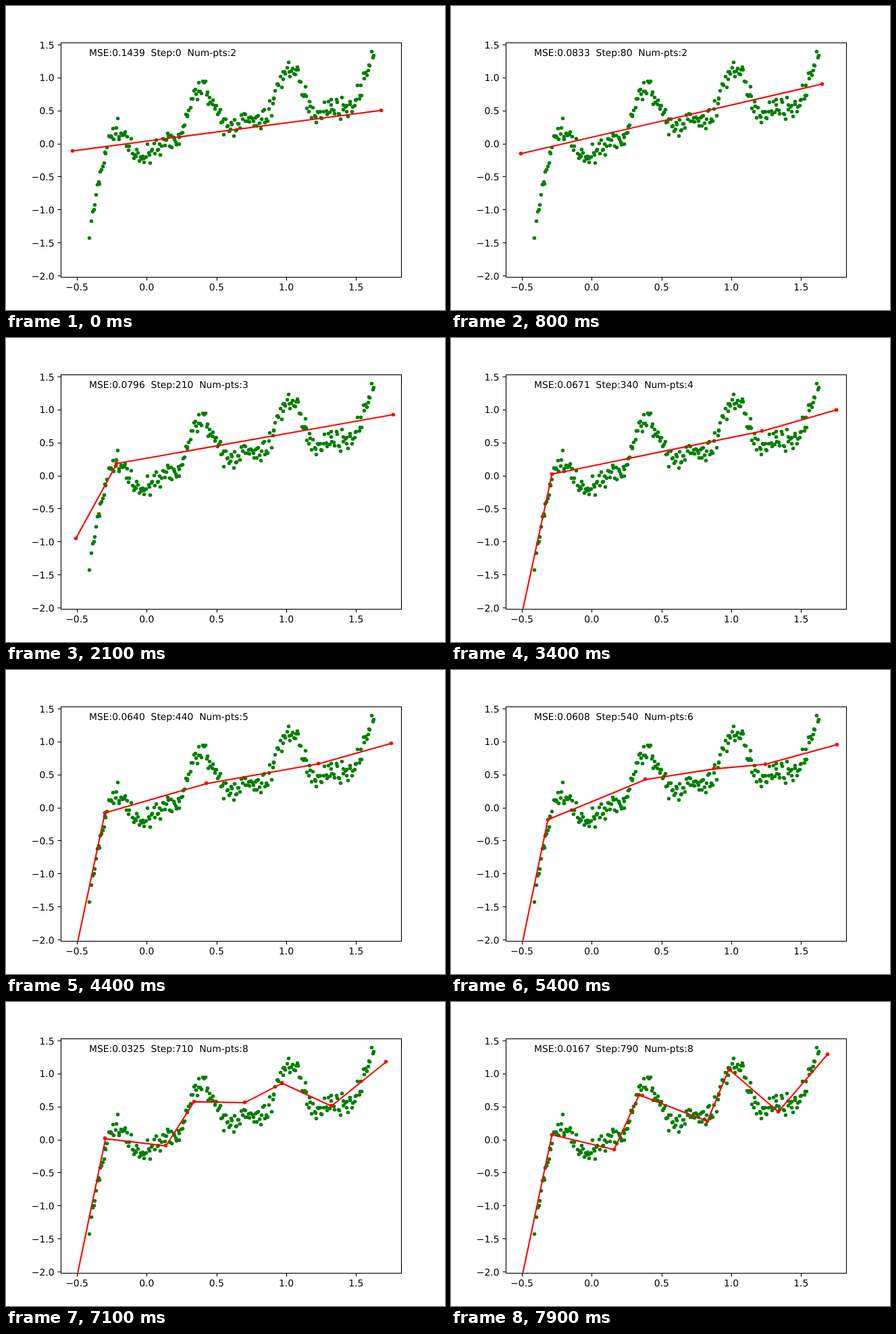
An HTML page that plays this animation: 650x450 px, repeating every 8000 ms.

```html
<!DOCTYPE html>
<html lang="en">
<head>
<meta charset="utf-8">
<title>Piecewise linear fit</title>
<style>
html, body { margin: 0; width: 100%; height: 100%; overflow: hidden; background: #fff; }
svg { display: block; }
text { font: 13.89px "DejaVu Sans", sans-serif; white-space: pre; text-rendering: geometricPrecision; }
</style>
</head>
<body>
<svg id="plot" width="650" height="450" viewBox="0 0 650 450">
  <clipPath id="area"><rect x="81.25" y="54" width="503.75" height="346.5"/></clipPath>
  <g clip-path="url(#area)">
    <g id="dots" fill="#008000"></g>
    <polyline id="line" transform="translate(.5 .5)" fill="none" stroke="#f00" stroke-width="2.08" stroke-linejoin="round" stroke-linecap="square"/>
    <g id="nodes" fill="#f00"></g>
  </g>
  <g id="axes" stroke="#000" stroke-width="1.11">
    <rect x="81.5" y="54.5" width="504" height="347" fill="none"/>
  </g>
  <g id="labels"></g>
  <text id="status" x="123" y="74"></text>
</svg>
<script>
const $ = id => document.getElementById(id);
const toX = x => 208.4 + x * 206.6;
const toY = y => 204.1 - y * 97.72;
const snap = v => Math.floor(v) + .5;

function add(parent, tag, attrs, text = '') {
  const el = document.createElementNS('http://www.w3.org/2000/svg', tag);
  for (const key in attrs) el.setAttribute(key, attrs[key]);
  el.textContent = text;
  return $(parent).appendChild(el);
}

function moveDot(el, x, y) {
  el.setAttribute('cx', snap(x));
  el.setAttribute('cy', snap(y));
}

const addDot = parent => add(parent, 'circle', { r: 2.78 });

// Linear interpolation over rows [key, value, ...], held at both ends
function sample(rows, key) {
  let i = 0;
  while (i < rows.length - 2 && rows[i + 1][0] <= key) i++;
  const [a, b] = [rows[i], rows[i + 1]];
  const f = Math.min(1, Math.max(0, (key - a[0]) / (b[0] - a[0])));
  return a.slice(1).map((v, k) => v + (b[k + 1] - v) * f);
}

// Axes
const format = v => v.toFixed(1).replace('-', '\u2212');
for (let v = -2; v <= 1.5; v += .5) {
  const y = toY(v);
  add('axes', 'path', { d: `M81.5 ${snap(y)}h-5` });
  add('labels', 'text', { x: 71.5, y: Math.round(y + 5), 'text-anchor': 'end' }, format(v));
  if (v < -.5) continue;
  const x = toX(v);
  add('axes', 'path', { d: `M${snap(x + .5)} 401.5v5` });
  add('labels', 'text', { x, y: 421, 'text-anchor': 'middle' }, format(v));
}

// Scatter: a wave with one harmonic on a logarithmic trend, plus noise
let seed = 7;
const random = () => (seed = seed * 16807 % 2147483647) / 2147483647;
const wave = x => {
  const p = 10 * (x - .39);
  return .47 + .48 * Math.log(x + .44) + .33 * Math.cos(p) + .16 * Math.cos(2 * p);
};
const count = 250;
for (let i = 0; i < count; i++) {
  const x = -.41 + 2.04 * (i + random()) / count;
  const noise = (random() + random() + random() - 1.5) * .14;
  moveDot(addDot('dots'), toX(x), toY(wave(x) + noise));
}

// Fitted nodes from left to right: [step, x, y]; each appears at its first step
const paths = [
  [[0, 98, 214], [80, 103, 218], [200, 102, 222], [210, 103, 296], [300, 103, 315], [340, 98, 438]],
  [[200, 165, 184], [340, 149, 201], [540, 143, 221], [640, 145, 207], [790, 149, 196]],
  [[600, 230, 205], [790, 241, 218]],
  [[400, 300, 170], [640, 278, 156], [790, 278, 137]],
  [[700, 350, 145], [790, 379, 176]],
  [[500, 383, 149], [640, 406, 138], [790, 411, 99]],
  [[300, 460, 137], [540, 465, 139], [640, 479, 146], [790, 484, 162]],
  [[0, 555, 154], [80, 549, 115], [210, 573, 113], [340, 570, 106], [540, 571, 110], [640, 567, 98], [790, 557, 77]]
];
const errors = [
  [0, .1439], [80, .0833], [210, .0796], [340, .0671], [540, .0608], [640, .0463], [790, .0167]
];
const markers = paths.map(() => addDot('nodes'));

function draw(now) {
  const step = Math.floor(now % 8000 / 100) * 10;
  const points = [];
  paths.forEach((path, i) => {
    const live = step >= path[0][0];
    markers[i].style.display = live ? '' : 'none';
    if (!live) return;
    const point = sample(path, step);
    points.push(point);
    moveDot(markers[i], ...point);
  });
  $('line').setAttribute('points', points.join(' '));
  $('status').textContent =
    `MSE:${sample(errors, step)[0].toFixed(4)}  Step:${step}  Num-pts:${points.length}`;
}

const start = performance.now();
function tick() {
  draw(performance.now() - start);
  requestAnimationFrame(tick);
}
tick();
</script>
</body>
</html>
```
